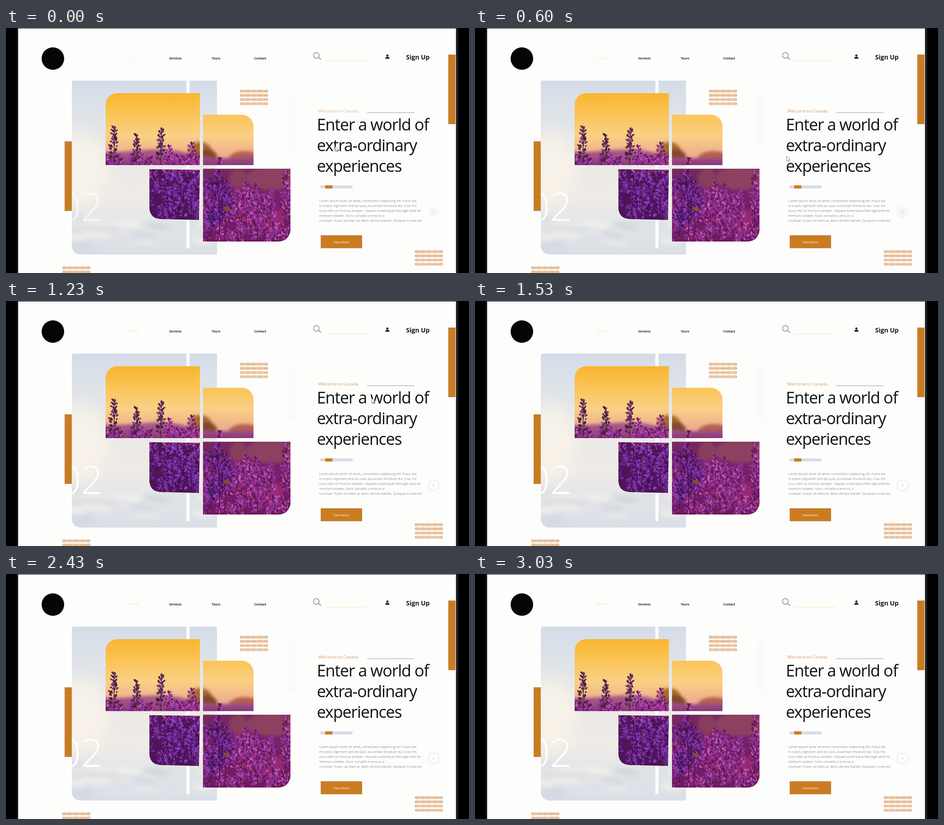
Animation of 1027x545 px, one loop 3.06 s. Source, as an HTML page with a canvas:

```html
<!DOCTYPE html>
<html lang="en">
<head>
<meta charset="utf-8">
<title>Travel landing page</title>
<style>
html, body { margin: 0; width: 100%; height: 100%; overflow: hidden; background: #000; }
canvas { display: block; width: 1027px; height: 545px; }
</style>
</head>
<body>
<canvas id="stage" width="1027" height="545"></canvas>
<script>
const W = 1027, H = 545, LOOP = 3060;
const SANS = '"Open Sans", "Noto Sans", sans-serif';
const ORANGE = '#cb7c20', PAGE = '#fdfdfc';

function layer() {
  const c = document.createElement('canvas');
  c.width = W;
  c.height = H;
  return c;
}

function seeded(seed) {
  return () => (seed = (seed * 16807) % 2147483647) / 2147483647;
}

function rect(g, x, y, w, h, fill) {
  g.fillStyle = fill;
  g.fillRect(x, y, w, h);
}

function round(g, x, y, w, h, radii, fill) {
  g.beginPath();
  g.roundRect(x, y, w, h, radii);
  g.fillStyle = fill;
  g.fill();
}

function oval(g, x, y, rx, ry, fill, turn = 0) {
  g.beginPath();
  g.ellipse(x, y, rx, ry, turn, 0, Math.PI * 2);
  g.fillStyle = fill;
  g.fill();
}

function line(g, x1, y1, x2, y2, color, width = 1) {
  g.beginPath();
  g.moveTo(x1, y1);
  g.lineTo(x2, y2);
  g.strokeStyle = color;
  g.lineWidth = width;
  g.stroke();
}

function block(g, x, y, w, h) {
  rect(g, x, y, w, h, ORANGE);
  g.strokeStyle = '#b58a62';
  g.lineWidth = 1;
  g.strokeRect(x + 0.5, y + 0.5, w - 1, h - 1);
}

function text(g, str, x, y, size, color, weight = 400, spacing = 0) {
  g.font = `${weight} ${size}px ${SANS}`;
  g.letterSpacing = spacing + 'px';
  g.fillStyle = color;
  g.fillText(str, x, y);
}

function vertical(g, y1, y2, ...stops) {
  const fill = g.createLinearGradient(0, y1, 0, y2);
  stops.forEach(([at, color]) => fill.addColorStop(at, color));
  return fill;
}

// One lavender head: whorls of slim petals along a stem
function sprig(g, x, top, h, w, colors, rnd) {
  const lean = (rnd() - 0.5) * 0.12;
  line(g, x, top, x + lean * h, top + h * 1.4, colors[0], 1.5);
  for (let y = 0; y < h; y += 8) {
    const spread = w * (0.45 + 0.55 * Math.min(1, 2 * y / h));
    for (let i = 0; i < 7; i++) {
      const side = rnd() * 2 - 1;
      const color = colors[Math.floor(rnd() * colors.length)];
      oval(g, x + lean * y + side * spread, top + y + rnd() * 5 - Math.abs(side) * 2,
        1.2 + rnd(), 2.2 + rnd() * 2, color, side * 1.1);
    }
  }
}

function drawPhoto(g) {
  const rnd = seeded(77);
  rect(g, 200, 140, 450, 350, vertical(g, 145, 280,
    [0, '#f9b52f'], [0.35, '#fbc456'], [0.7, '#f9d084'], [1, '#efb08c']));

  g.filter = 'blur(3px)';
  oval(g, 430, 273, 26, 19, '#a8692f');
  oval(g, 446, 287, 22, 17, '#81492f');
  oval(g, 530, 291, 36, 17, '#b4604f');
  g.beginPath();
  g.moveTo(200, 273);
  g.bezierCurveTo(270, 284, 330, 257, 400, 278);
  g.bezierCurveTo(470, 300, 550, 282, 650, 286);
  g.lineTo(650, 490);
  g.lineTo(200, 490);
  g.fillStyle = vertical(g, 265, 475,
    [0, '#b0648a'], [0.13, '#9c4a86'], [0.25, '#75285f'], [0.6, '#76206c'], [1, '#701a60']);
  g.fill();

  rect(g, 310, 310, 122, 125, 'rgba(54, 14, 78, 0.6)');
  oval(g, 590, 335, 60, 26, '#8d4160');
  oval(g, 515, 335, 20, 22, '#87405c');
  oval(g, 570, 425, 50, 26, '#96286f');
  g.filter = 'none';

  const dark = ['#452042', '#5d2a4a', '#7c3b84', '#4b2138'];
  const deep = ['#40124e', '#5c1f86', '#7c38b6', '#4a1558', '#8f40bd', '#7a2a86'];
  const pink = ['#641a55', '#842a86', '#a9399f', '#c05ab4', '#8338a8', '#5e1a52', '#982e84'];
  const field = (x, y, w, h, count, colors) => {
    for (let i = 0; i < count; i++) {
      sprig(g, x + rnd() * w, y + rnd() * h, 20 + rnd() * 24, 8, colors, rnd);
    }
  };
  field(222, 279, 205, 16, 30, pink);
  field(318, 304, 110, 100, 48, deep);
  field(440, 350, 190, 105, 64, pink);
  field(440, 325, 60, 110, 14, deep);
  sprig(g, 240, 220, 76, 10, dark, rnd);
  sprig(g, 290, 237, 58, 8, dark, rnd);
  sprig(g, 345, 223, 68, 9, dark, rnd);
  sprig(g, 362, 262, 36, 8, pink, rnd);
  sprig(g, 412, 255, 44, 11, pink, rnd);
  sprig(g, 474, 290, 20, 9, pink, rnd);
  sprig(g, 470, 316, 100, 15, deep, rnd);
  sprig(g, 533, 341, 60, 8, pink, rnd);
  sprig(g, 556, 348, 52, 7, pink, rnd);
  sprig(g, 589, 360, 70, 10, pink, rnd);
  sprig(g, 621, 318, 84, 11, pink, rnd);
  oval(g, 491, 403, 8, 4, '#8d4d28', 0.4);
}

function drawTiles(g) {
  const photo = layer();
  drawPhoto(photo.getContext('2d'));
  const tiles = [
    [221, 145, 209, 160, [26, 0, 0, 0]],
    [437, 193, 112, 112, [0, 26, 0, 0]],
    [437, 313, 194, 162, [0, 0, 26, 0]]
  ];
  const paint = path => {
    g.save();
    g.clip(path);
    g.drawImage(photo, 0, 0);
    g.restore();
  };
  for (const tile of tiles) {
    const path = new Path2D();
    path.roundRect(...tile);
    paint(path);
  }
  paint(new Path2D('M318 314L430 315.5L428 427L344 425Q318 424 318 398Z'));
}

function drawPanel(g) {
  g.save();
  g.beginPath();
  g.roundRect(146, 117, 322, 387, [5, 2, 2, 19]);
  g.clip();
  rect(g, 146, 117, 322, 387, vertical(g, 117, 504,
    [0, '#d4dce8'], [0.2, '#dfe3e9'], [0.45, '#ebeae7'], [0.68, '#efece6'],
    [0.82, '#e4e6e8'], [1, '#d9dfe6']));
  g.filter = 'blur(6px)';
  const rnd = seeded(31);
  for (let i = 0; i < 20; i++) {
    oval(g, 146 + rnd() * 322, 415 + rnd() * 80, 18 + rnd() * 30, 3 + rnd() * 6,
      i % 2 ? 'rgba(250, 246, 238, 0.6)' : 'rgba(205, 212, 222, 0.6)', 0.1);
  }
  g.filter = 'blur(18px)';
  oval(g, 165, 310, 60, 80, 'rgba(252, 245, 234, 0.7)');
  g.filter = 'none';
  rect(g, 400, 117, 7, 373, 'rgba(255, 255, 255, 0.9)');
  g.restore();
}

function drawBraid(g, x, y) {
  g.lineWidth = 1;
  for (let row = 0; row < 4; row++) {
    const cy = y + 3.5 + row * 9.3;
    line(g, x, cy, x + 62, cy, '#dfab7c', 1.4);
    for (let i = 0; i < 9; i++) {
      g.beginPath();
      g.ellipse(x + 3.6 + i * 6.85, cy, 3.1, 2.5, 0, 0, Math.PI * 2);
      g.strokeStyle = i % 2 ? '#e8bd92' : '#e0ab7e';
      g.stroke();
    }
  }
}

function drawHeader(g) {
  oval(g, 104, 68, 25, 25, '#050505');
  text(g, 'Services', 362, 69.7, 6.8, '#222', 700, -0.05);
  text(g, 'Tours', 456.5, 69.7, 6.8, '#222', 700, 0.1);
  text(g, 'Contact', 550.5, 69.7, 6.8, '#222', 700, 0.05);

  g.beginPath();
  g.arc(688.5, 61, 6.3, 0, Math.PI * 2);
  g.strokeStyle = '#77777c';
  g.lineWidth = 1.2;
  g.stroke();
  line(g, 693, 65.5, 699, 70.5, '#77777c', 1.3);
  line(g, 709, 73.5, 799, 73.5, '#ecebb5');

  oval(g, 846, 61.2, 2.4, 2.5, '#111');
  round(g, 841.5, 64.4, 9, 3.8, [3, 3, 0, 0], '#111');
  text(g, 'Sign Up', 887.5, 69.5, 14, '#161616', 700);
}

function drawCopy(g) {
  line(g, 801, 188.5, 906, 188.5, '#9a9a9e');
  ['Enter a world of', 'extra-ordinary', 'experiences'].forEach((str, i) =>
    text(g, str, 689.5, 228 + i * 46, 36, '#111', 400, -1.2));

  round(g, 697, 350, 72, 7, 3, '#dcdae4');
  rect(g, 708, 350, 16, 7, ORANGE);

  [
    'Lorem ipsum dolor sit amet, consectetur adipiscing elit. Fusce dia',
    'm turpis, dignissim sed dui quis, accumsan tincidunt dui. Cras rho',
    'ncus nibh ut rhoncus semper. Aliquam scelerisque felis eget ante fer',
    'mentum sodales. Nunc convallis a eros eu a',
    'ccumsan. Fusce vel diam ac diam ultrices blandit. Quisque in erat est.'
  ].forEach((str, i) => text(g, str, 695, 387 + i * 11.1, 7.3, '#55555a', 300, 0.03));

  block(g, 698, 461, 92, 29);
  text(g, 'View More', 726, 479, 7.3, '#fff6e8');
}

function drawFixed() {
  const c = layer(), g = c.getContext('2d');
  rect(g, 0, 0, W, H, '#000');
  rect(g, 24, 0, 3, H, '#1c1c1e');
  rect(g, 998, 0, 5, H, '#222225');
  rect(g, 27, 1, 971, H - 1, PAGE);

  // Barely visible tower behind the page
  g.filter = 'blur(3px)';
  round(g, 627, 150, 15, 115, 7, '#fafafa');
  g.filter = 'none';

  drawPanel(g);
  drawBraid(g, 519, 137);
  drawBraid(g, 907, 494);
  drawBraid(g, 125, 530);
  drawTiles(g);
  drawHeader(g);
  drawCopy(g);
  block(g, 981, 59, 16, 155);
  return c;
}

const mix = (a, b, k) => a + (b - a) * k;
const ramp = (t, from, to) => Math.min(1, Math.max(0, (t - from) / (to - from)));
const smooth = k => k * k * (3 - 2 * k);

// Time, x, y of the pointer tip
const pointerPath = [
  [30, 730, 263], [280, 691, 285], [980, 691, 285], [1230, 811, 216], [1480, 1005, 100]
];

function pointerAt(t) {
  let [, x, y] = pointerPath[0];
  for (let i = 1; i < pointerPath.length; i++) {
    const [t0] = pointerPath[i - 1], [t1, x1, y1] = pointerPath[i];
    const k = smooth(ramp(t, t0, t1));
    x = mix(x, x1, k);
    y = mix(y, y1, k);
  }
  return [x, y];
}

const arrow = new Path2D('M0 0V11.5L2.7 9L4.7 13L6.4 12.2L4.6 8.3H8.2Z');

function drawPointer(g, t) {
  if (t > 1480) return;
  g.save();
  g.beginPath();
  g.rect(27, 1, 971, H);
  g.clip();
  g.translate(...pointerAt(t));
  g.fillStyle = '#fff';
  g.fill(arrow);
  g.strokeStyle = '#77777c';
  g.lineWidth = 0.9;
  g.stroke(arrow);
  g.restore();
}

function drawFading(g, t) {
  const k = ramp(t, 0, 1400);

  g.save();
  g.beginPath();
  g.rect(146, 340, 75, 110);
  g.clip();
  g.globalAlpha = mix(0.6, 1, ramp(t, 0, 800));
  text(g, '02', 117, 429, 86, '#fff', 300);
  g.restore();
  block(g, 130, 252, 16, 155);

  g.save();
  g.globalAlpha = mix(0.35, 1, k);
  text(g, 'Home', 268.5, 69.8, 9.2, '#efe9cf', 400);
  g.globalAlpha = mix(0.7, 1, ramp(t, 0, 600));
  text(g, 'Welcome to Canada', 692.5, 188, 9.7, '#d89a68', 400, -0.05);

  g.globalAlpha = mix(0.25, 1, k);
  g.shadowColor = 'rgba(90, 90, 120, 0.25)';
  g.shadowBlur = 5;
  oval(g, 948.5, 410, 10.5, 10.5, '#fff');
  g.shadowBlur = 0;
  text(g, '>', 946.5, 412.5, 7, '#77777c');
  g.restore();
}

const ctx = document.getElementById('stage').getContext('2d');
const fixed = drawFixed();
const start = performance.now();

function frame() {
  const t = (performance.now() - start) % LOOP;
  ctx.drawImage(fixed, 0, 0);
  drawFading(ctx, t);
  drawPointer(ctx, t);
  requestAnimationFrame(frame);
}
frame();
</script>
</body>
</html>
```
